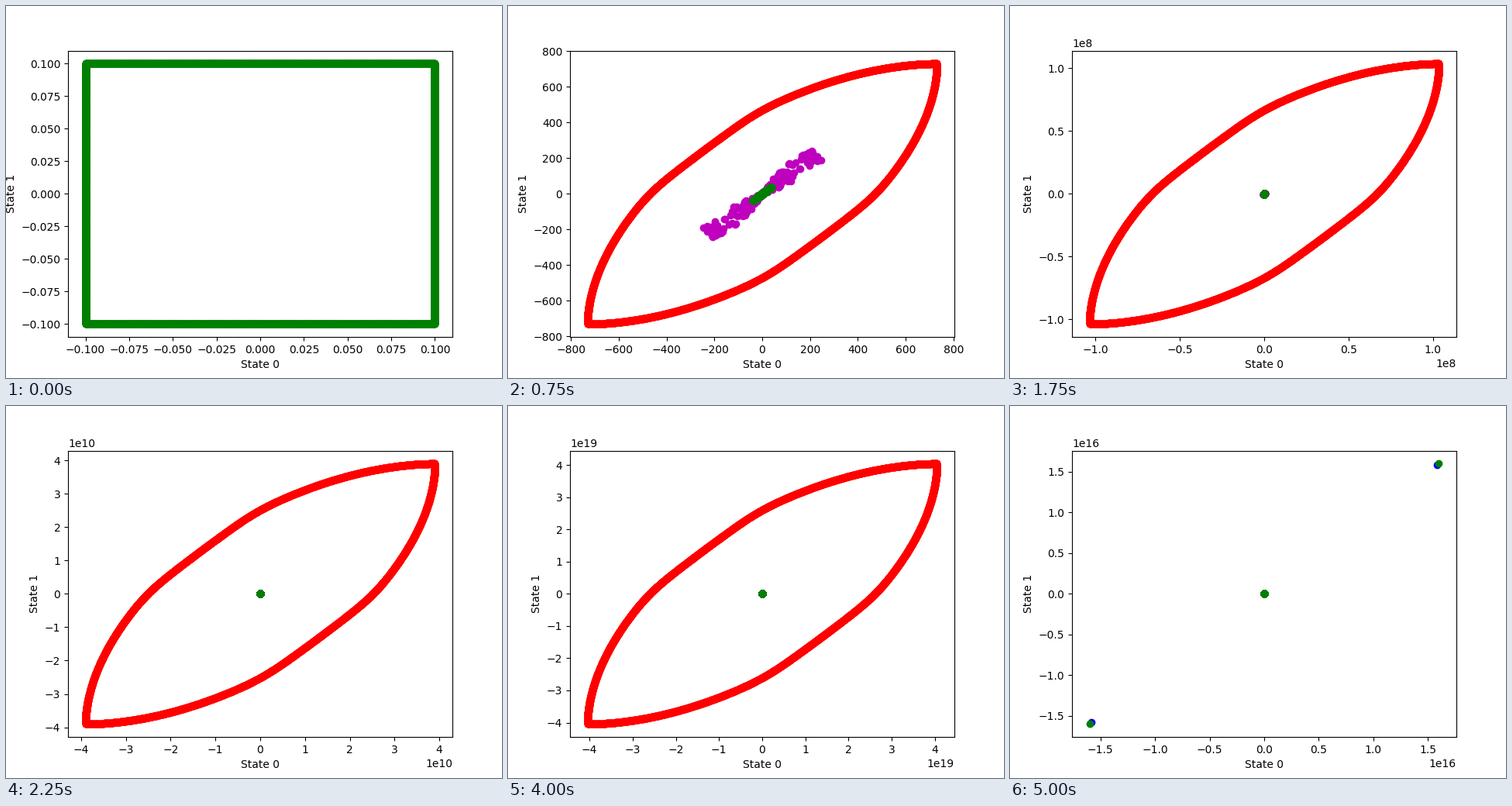
Animation, 640 px wide and 480 px high, one loop 5.25 s. Source, as a matplotlib script:

```python
import numpy as np
import matplotlib.pyplot as plt
from matplotlib.animation import FuncAnimation

plt.rcParams["font.family"] = "DejaVu Sans"
plt.rcParams["axes.formatter.limits"] = (-7, 7)

STEPS = 21
START = 0.1
BOUND_GROWTH = 19.406
STATE_GROWTH = 7.248
SAMPLE_GROWTH = 6.3
SAMPLE_REACH = 232 / SAMPLE_GROWTH ** 3
BOUND_END = 18  # the outer bound is lost from this step on

fig, ax = plt.subplots(figsize=(6.4, 4.8), dpi=100)


def both(pts):
    """Add the point reflection through the origin."""
    return np.vstack([pts, -pts])


def from_diagonal(u, v):
    """u runs along the diagonal, v across it."""
    return np.column_stack([u - v, u + v])


def square(n=1000):
    t = np.linspace(-1, 1, n)
    one = np.ones(n)
    return both(np.vstack([np.column_stack([t, one]),
                           np.column_stack([one, t])]))


def bound_outline(n=1600, flat=0.336, sharp=30):
    """Lens with power-law arcs at the tips, blended into flat sides."""
    x = np.linspace(-0.5, 1, 600)
    y = 1 - 0.35 * (1 - x) ** 1.87
    u = np.linspace(-1, 1, n)
    arc = np.interp(abs(u), (x + y) / 2, (y - x) / 2)
    v = arc / (1 + (arc / flat) ** sharp) ** (1 / sharp)
    return both(from_diagonal(u, v))


def sample_cloud(n=100):
    """Wedge of samples, dense near the origin and narrowing outwards."""
    rng = np.random.default_rng(4)
    r = rng.random(n) ** 2
    slope = rng.uniform(-0.38, 0.38, n) * (1 - 0.7 * r)
    return both(from_diagonal(r, r * slope))


SQUARE = square()
OUTLINE = bound_outline()
CLOUD = sample_cloud()
CORNERS = np.array([(1, 1), (-1, -1)])


def states(k):
    """Start square, stretched along the diagonal and thinned across it."""
    u = SQUARE.sum(axis=1) / 2
    v = (SQUARE[:, 1] - SQUARE[:, 0]) / 2 * 0.35 ** k
    return START * STATE_GROWTH ** k * from_diagonal(u, v)


def dots(pts, color):
    ax.scatter(pts[:, 0], pts[:, 1], s=36, c=color)


def draw(k):
    ax.clear()
    if k >= BOUND_END:
        size = START * STATE_GROWTH ** k
        dots(0.988 * size * CORNERS, "b")
        dots(size * np.vstack([CORNERS, 1e-6 * SQUARE]), "g")
    else:
        if k:
            bound = START * BOUND_GROWTH ** k
            spread = min(SAMPLE_REACH * SAMPLE_GROWTH ** k, 0.6 * bound)
            dots(bound * OUTLINE, "r")
            dots(spread * CLOUD, "m")
        dots(states(k), "g")
    ax.set_xlabel("State 0")
    ax.set_ylabel("State 1")
    return []


anim = FuncAnimation(fig, draw, frames=STEPS, init_func=lambda: [],
                     interval=250, repeat=True, repeat_delay=0)
plt.show()
```
